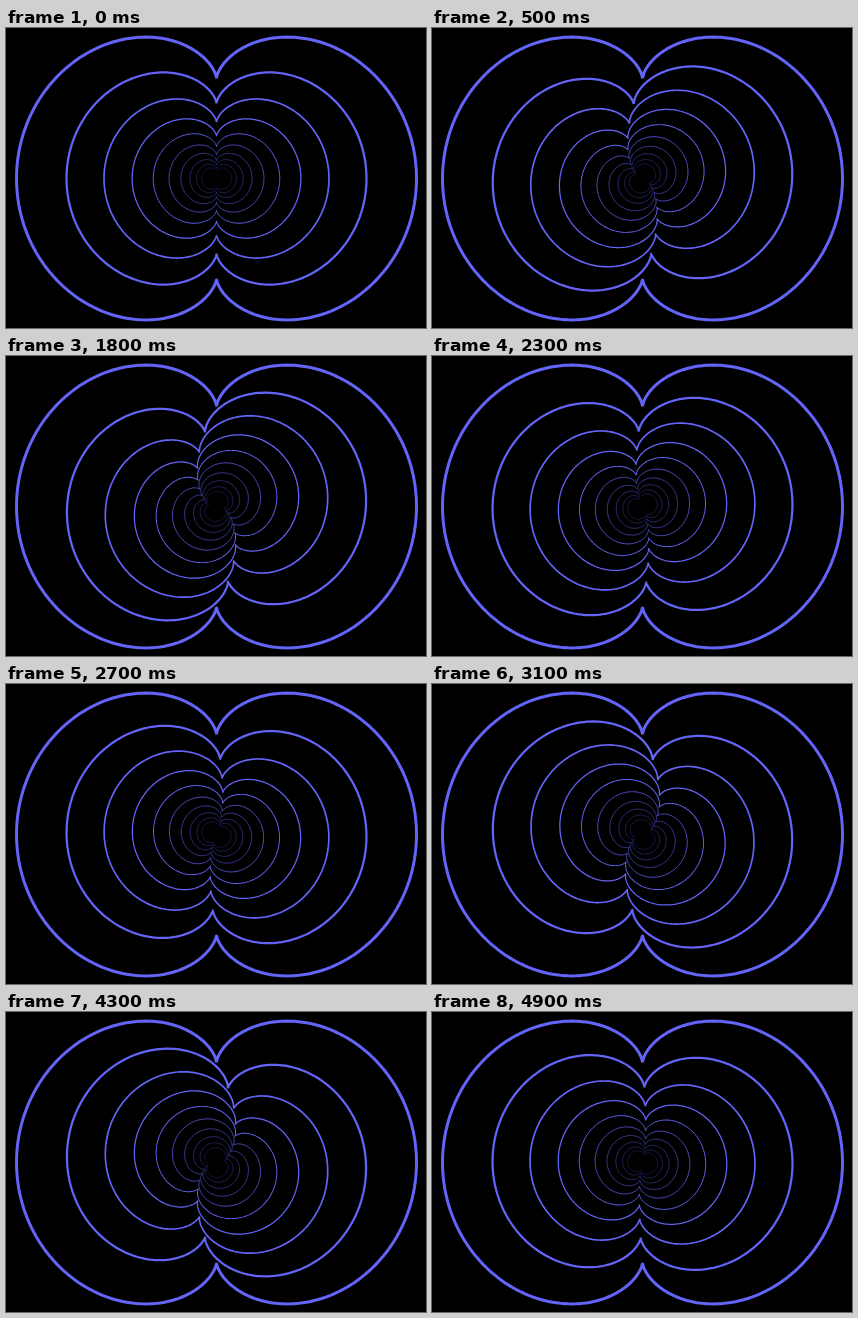
Animation, 420 px wide and 300 px high, one loop 5000 ms. Source, as an HTML page with a canvas:

```html
<!DOCTYPE html>
<html lang="en">
<head>
<meta charset="utf-8">
<title>Nested nephroids</title>
<style>
  html, body { margin: 0; width: 100%; height: 100%; overflow: hidden; background: #000; }
  canvas { display: block; }
</style>
</head>
<body>
<canvas id="stage" width="420" height="300"></canvas>
<script>
  const ctx = document.getElementById('stage').getContext('2d');
  const LOOP = 5000, STEP = 100;
  const RINGS = 10, SHRINK = 0.75, SWING = 0.198;
  const SIZE = 50, POINTS = 360;

  // Nephroid with its cusps at the top and bottom
  const ring = new Path2D();
  for (let i = 0; i < POINTS; i++) {
    const a = i / POINTS * 2 * Math.PI;
    ring.lineTo(SIZE * (3 * Math.sin(a) - Math.sin(3 * a)),
                SIZE * (3 * Math.cos(a) - Math.cos(3 * a)));
  }
  ring.closePath();

  function draw(ms) {
    const twist = -SWING * Math.sin(2 * Math.PI * ms / LOOP);
    ctx.setTransform(1, 0, 0, 1, 0, 0);
    ctx.fillStyle = '#000';
    ctx.fillRect(0, 0, 420, 300);
    ctx.translate(210.5, 150.5);
    ctx.strokeStyle = '#6464f8';
    ctx.lineWidth = 3;
    for (let i = 0; i < RINGS; i++) {
      ctx.stroke(ring);
      ctx.rotate(twist);
      ctx.scale(SHRINK, SHRINK);
    }
  }

  const start = performance.now();
  function tick() {
    const ms = (performance.now() - start) % LOOP;
    draw(Math.floor(ms / STEP) * STEP);
    requestAnimationFrame(tick);
  }
  tick();
</script>
</body>
</html>
```
